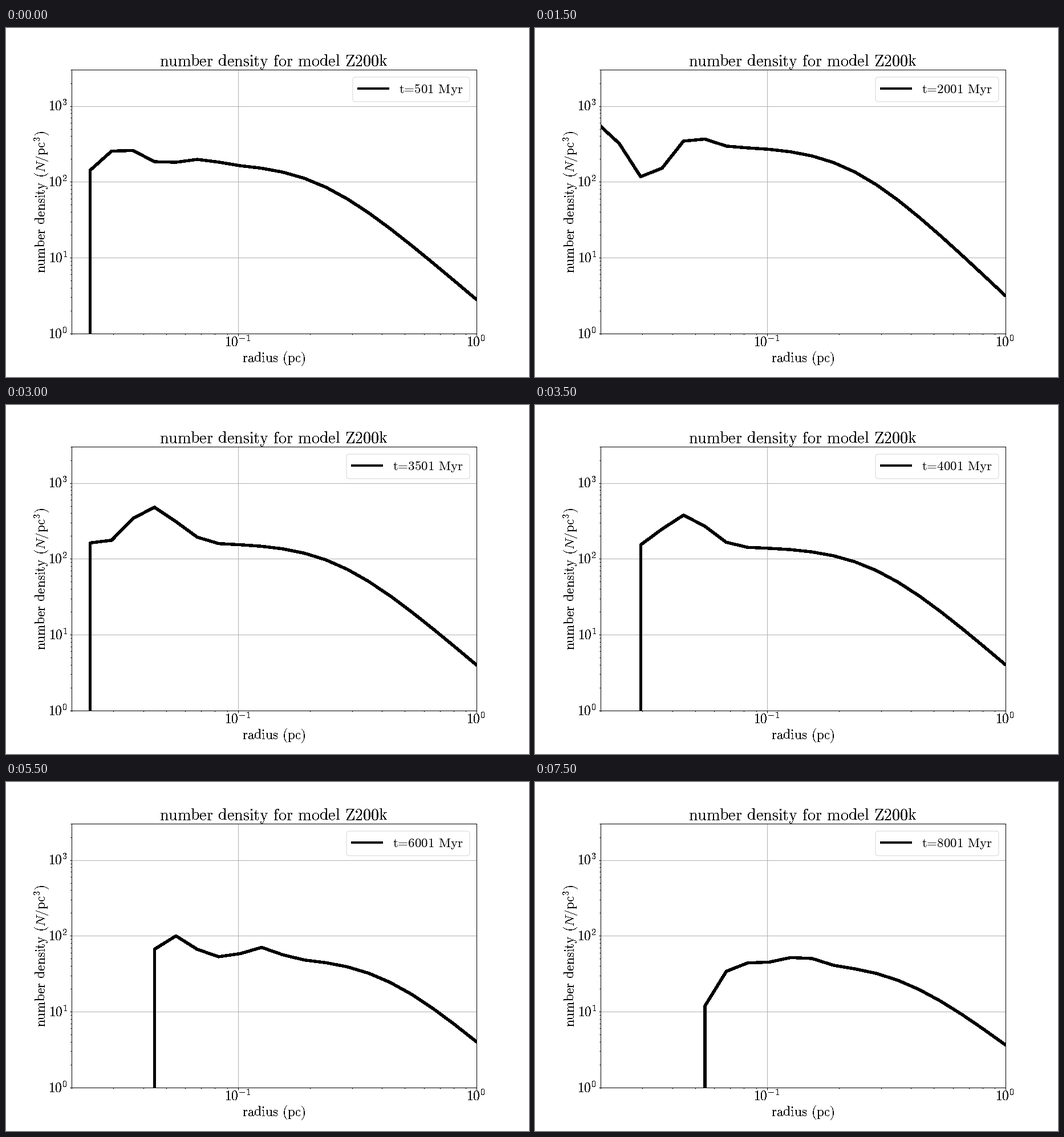
These frames come from a looping animation (917 by 611 pixels, 8000 ms). A matplotlib script:

```python
import numpy as np
import matplotlib.pyplot as plt
from matplotlib.animation import FuncAnimation
from matplotlib.patches import FancyBboxPatch
from matplotlib.ticker import NullFormatter

plt.rcParams["mathtext.fontset"] = "cm"

W, H, DPI = 917, 611, 64
PX = 72 / DPI  # points per pixel
FRAMES, STEP_MS = 16, 500

bins = np.arange(20)
radius = 10 ** (-0.0036 - 0.0898 * (19 - bins))


def density(plateau, core, slope, *bumps):
    """Log density: a flat core, a power-law tail, and (bin, height) bumps."""
    dex = plateau - slope / 3 * np.log10(1 + (radius / core) ** 3)
    return dex + sum(h * np.exp(-(bins - b) ** 2) for b, h in bumps)


# the cluster at a few steps; the steps between are blended
EPOCHS = {
    0: density(2.25, 0.215, 2.7, (1, -0.13), (2.4, 0.24), (6.2, 0.06)),
    3: density(2.47, 0.220, 3.0, (0, 0.3), (2.35, -0.46), (4.5, 0.13)),
    6: density(2.21, 0.254, 2.7, (3.6, 0.46), (5, 0.22)),
    9: density(2.06, 0.305, 2.8, (4.4, 0.36)),
    11: density(1.72, 0.392, 2.7, (5, 0.28), (9, 0.14)),
    13: density(1.76, 0.319, 2.4, (3.8, -0.45), (6.4, 0.2)),
    15: density(1.65, 0.356, 2.4, (4.7, -0.63), (9.5, 0.1)),
}
# innermost bin that holds any star, at each step
FIRST_BIN = [1, 1, 0, 0, 2, 1, 1, 2, 2, 3, 1, 4, 1, 4, 5, 5]


def profile(i):
    """Radii and densities at step i, with a drop to zero at the inner edge."""
    first = FIRST_BIN[i]
    dex = [np.interp(i, list(EPOCHS), col) for col in zip(*EPOCHS.values())]
    return (np.r_[radius[first], radius[first:]],
            np.r_[1e-3, 10 ** np.array(dex[first:])])


def roman(text):
    text = text.replace(" ", r"\hspace{0.38}")
    text = text.replace("=", r"\hspace{-0.2}=\hspace{-0.2}")
    return rf"$\mathrm{{{text}}}$"


fig = plt.figure(figsize=(W / DPI, H / DPI), dpi=DPI, facecolor="white")
ax = fig.add_axes([0.125, 0.125, 0.775, 0.755])
ax.set(xscale="log", yscale="log", xlim=(0.02, 1), ylim=(1, 3000))
ax.grid(True, color="#b0b0b0", lw=PX, antialiased=False)
ax.tick_params(which="major", length=3.5 * PX, width=PX,
               labelbottom=False, labelleft=False)
ax.tick_params(which="minor", length=2 * PX, width=PX)
for axis in (ax.xaxis, ax.yaxis):
    axis.set_minor_formatter(NullFormatter())
for spine in ax.spines.values():
    spine.set(linewidth=PX, antialiased=False)


def label(x, y, text, size=23.4, ha="center", antialiased=False, **kw):
    """Text with its baseline at pixel (x, y), measured from the top left."""
    return fig.text(x / W, 1 - y / H, text, fontsize=size * PX, ha=ha,
                    va="baseline", antialiased=antialiased, **kw)


label(469.5, 67.3, roman("number density for model Z200k"), 28)
label(470, 585, roman("radius (pc)"))
label(69, 304, roman("number density (") + r"$N/\mathrm{pc}^3\mathrm{)}$",
      rotation=90, rotation_mode="anchor")
for n in range(4):
    label(108, 543 - 132.67 * n, f"$10^{{{n}}}$", ha="right")
label(406, 558, "$10^{-1}$")
label(824, 558, "$10^{0}$")

curve, = ax.plot([], [], color="black", lw=4.4 * PX, zorder=2.5,
                 antialiased=False)

# legend, drawn in pixel coordinates
over = fig.add_axes([0, 0, 1, 1])
over.set(xlim=(0, W), ylim=(H, 0))
over.axis("off")
box = FancyBboxPatch((608, 86), 205, 43, boxstyle="round,pad=0,rounding_size=5",
                     fc=(1, 1, 1, 0.8), ec=(0.8, 0.8, 0.8, 0.8), lw=PX)
over.add_patch(box)
handle, = over.plot([], [], color="black", lw=4 * PX,
                    solid_capstyle="projecting")
time_text = label(689, 114, "", 23, ha="left", antialiased=True)


def draw(i):
    curve.set_data(*profile(i))
    myr = 501 + 500 * i
    left = 608 if myr < 1000 else 597
    box.set_x(left)
    box.set_width(813 - left)
    handle.set_data([left + 10.3, left + 61.5], [105.5, 105.5])
    time_text.set_text(roman(f"t={myr} Myr"))
    time_text.set_x((left + 81) / W)
    return curve, box, handle, time_text


anim = FuncAnimation(fig, draw, frames=FRAMES, init_func=lambda: draw(0),
                     interval=STEP_MS, repeat=True, blit=False)
plt.show()
```
